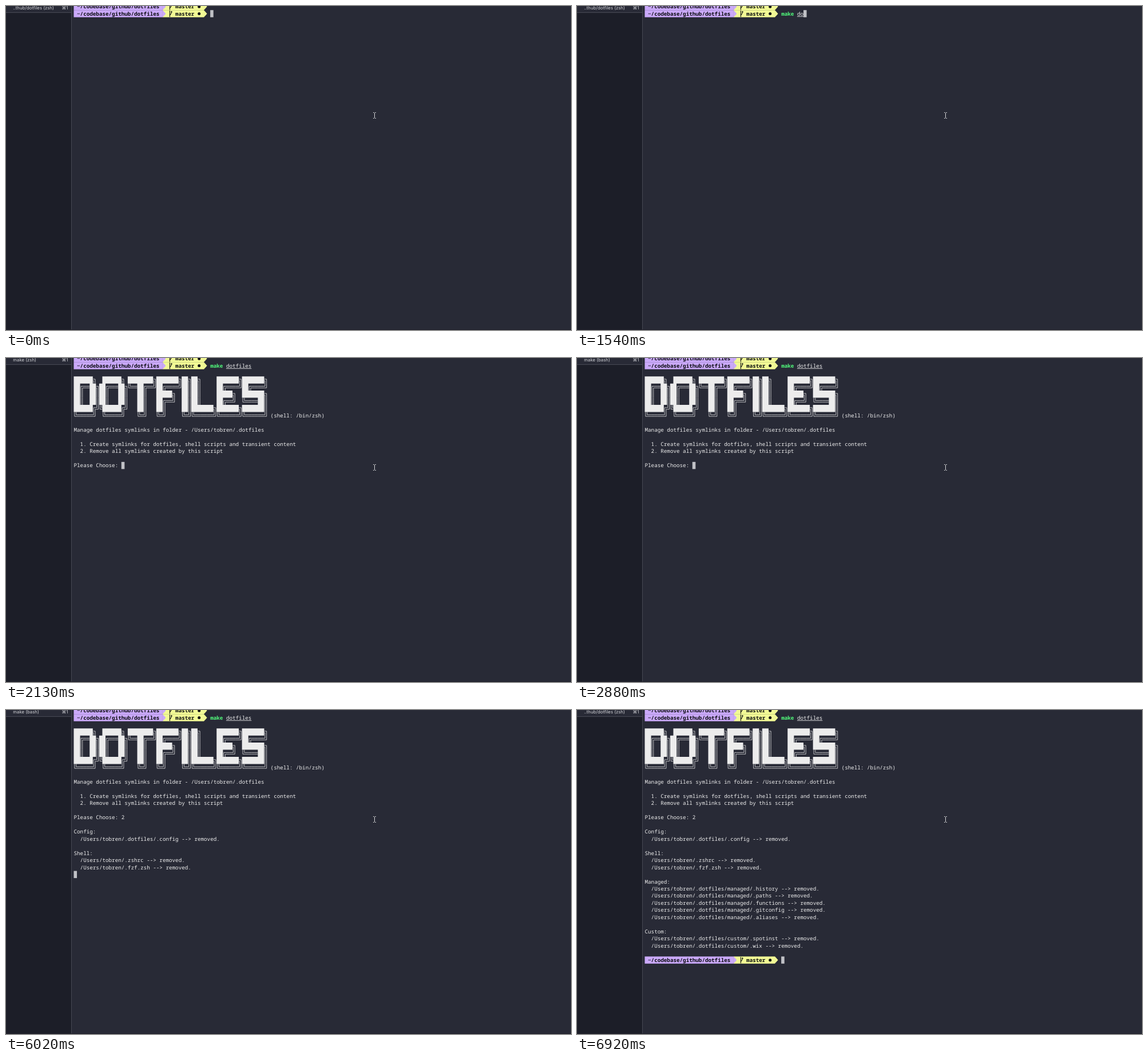
Animation, 988 px wide and 567 px high, one loop 8000 ms. Source, as an HTML page with a canvas:

```html
<!DOCTYPE html>
<html lang="en">
<head>
<meta charset="utf-8">
<title>Terminal session</title>
<style>
html, body { margin: 0; width: 100%; height: 100%; overflow: hidden; background: #282a36; }
canvas { display: block; }
</style>
</head>
<body>
<canvas id="stage" width="988" height="567"></canvas>
<script>
const ctx = document.getElementById('stage').getContext('2d');
const LOOP = 8000;
const CELL_W = 5.55, CELL_H = 12.475, LEFT = 118.5, TOP = 7.2;
const MONO = '9.25px "Noto Sans Mono", monospace';
const COLOR = {
  back: '#282a36', side: '#1c1e28', rule: '#474954', text: '#ececec', cursor: '#c0c1c6',
  path: '#caa9fa', branch: '#f2fa95', ink: '#0b0c10', valid: '#50fa7b', invalid: '#ff5555'
};

const BANNER = [
  '██████╗  ██████╗ ████████╗███████╗██╗██╗     ███████╗███████╗',
  '██╔══██╗██╔═══██╗╚══██╔══╝██╔════╝██║██║     ██╔════╝██╔════╝',
  '██║  ██║██║   ██║   ██║   █████╗  ██║██║     █████╗  ███████╗',
  '██║  ██║██║   ██║   ██║   ██╔══╝  ██║██║     ██╔══╝  ╚════██║',
  '██████╔╝╚██████╔╝   ██║   ██║     ██║███████╗███████╗███████║',
  '╚═════╝  ╚═════╝    ╚═╝   ╚═╝     ╚═╝╚══════╝╚══════╝╚══════╝'
];
const HOME = '/Users/tobren/';
const removed = path => `  ${HOME}${path} --> removed.`;
const MENU = [
  `Manage dotfiles symlinks in folder - ${HOME}.dotfiles`, '',
  '  1. Create symlinks for dotfiles, shell scripts and transient content',
  '  2. Remove all symlinks created by this script'
];
const FIRST_OUTPUT = [
  'Config:', removed('.dotfiles/.config'), '',
  'Shell:', removed('.zshrc'), removed('.fzf.zsh')
];
const LAST_OUTPUT = [
  'Managed:',
  ...['history', 'paths', 'functions', 'gitconfig', 'aliases'].map(n => removed('.dotfiles/managed/.' + n)),
  '', 'Custom:',
  ...['spotinst', 'wix'].map(n => removed('.dotfiles/custom/.' + n))
];

// Each entry lists what changes from its start time on.
const TIMELINE = [
  { at: 0, tab: '..thub/dotfiles (zsh)', command: '', tint: 'text', target: '', cursor: [43, 0] },
  { at: 500, command: 'm', cursor: [44, 0] },
  { at: 650, command: 'mak', tint: 'invalid', cursor: [46, 0] },
  { at: 800, command: 'make', tint: 'valid', cursor: [47, 0] },
  { at: 1090, cursor: [48, 0] },
  { at: 1540, target: 'do', underline: true, cursor: [50, 0] },
  { at: 1690, target: 'dot', cursor: [51, 0] },
  { at: 1840, target: 'dotfiles', underline: false, cursor: [57, 0] },
  { at: 2130, tab: 'make (zsh)', underline: true, menu: true, choice: '', cursor: [15, 14] },
  { at: 2880, tab: 'make (bash)' },
  { at: 3920, choice: '2', cursor: [16, 14] },
  { at: 6020, first: true, cursor: [0, 22] },
  { at: 6170, tab: '..thub/dotfiles (bash)', last: true, cursor: [0, 34] },
  { at: 6320, prompt: true, cursor: [43, 34] },
  { at: 6920, tab: '..thub/dotfiles (zsh)' }
];

const colX = col => LEFT + col * CELL_W;
const rowY = row => TOP + row * CELL_H;

function rect(color, x, y, w, h) {
  ctx.fillStyle = color;
  ctx.fillRect(x, y, w, h);
}

function polygon(color, points) {
  ctx.fillStyle = color;
  ctx.beginPath();
  points.forEach(([x, y]) => ctx.lineTo(x, y));
  ctx.fill();
}

function print(text, col, row, color = COLOR.text, weight = 500) {
  ctx.font = `${weight} ${MONO}`;
  ctx.fillStyle = color;
  ctx.fillText(text, colX(col), rowY(row) + 9.4);
}

const printLines = (lines, row) => lines.forEach((line, i) => print(line, 0, row + i));

function arrowTip(color, col, y) {
  const x = colX(col);
  polygon(color, [[x, y], [x + CELL_W, y + CELL_H / 2], [x, y + CELL_H]]);
}

function drawPrompt(row) {
  const y = rowY(row);
  rect(COLOR.path, LEFT, y, 28 * CELL_W, CELL_H);
  rect(COLOR.branch, colX(28), y, 13 * CELL_W, CELL_H);
  arrowTip(COLOR.path, 28, y);
  arrowTip(COLOR.branch, 41, y);
  print('~/codebase/github/dotfiles', 1, row, COLOR.ink, 700);
  print('master', 32, row, COLOR.ink, 700);

  const x = colX(30);
  ctx.strokeStyle = COLOR.ink;
  ctx.lineWidth = 1.1;
  ctx.beginPath();
  ctx.moveTo(x + 1.4, y + 0.8);
  ctx.lineTo(x + 1.4, y + 12);
  ctx.moveTo(x + 1.4, y + 9.6);
  ctx.bezierCurveTo(x + 1.4, y + 7, x + 4.4, y + 8, x + 4.4, y + 3);
  ctx.stroke();
  polygon(COLOR.ink, [[x + 2.8, y + 3.8], [x + 4.4, y + 1.3], [x + 6, y + 3.8]]);

  ctx.beginPath();
  ctx.arc(colX(39.5), y + 6.4, 2.5, 0, 7);
  ctx.fill();
}

// Horizontal and vertical direction in which each corner opens.
const CORNERS = { '╔': [1, 1], '╗': [-1, 1], '╚': [1, -1], '╝': [-1, -1] };

function traceDouble(char, x, y) {
  const cx = x + CELL_W / 2, cy = y + CELL_H / 2;
  for (const gap of [-1.4, 1.4]) {
    if (char === '═') {
      ctx.moveTo(x, cy + gap);
      ctx.lineTo(x + CELL_W, cy + gap);
    } else if (char === '║') {
      ctx.moveTo(cx + gap, y);
      ctx.lineTo(cx + gap, y + CELL_H);
    } else {
      const [dx, dy] = CORNERS[char];
      ctx.moveTo(cx + dx * CELL_W / 2, cy - gap * dy);
      ctx.lineTo(cx - gap * dx, cy - gap * dy);
      ctx.lineTo(cx - gap * dx, cy + dy * CELL_H / 2);
    }
  }
}

function eachBannerCell(draw) {
  BANNER.forEach((line, row) => [...line].forEach((char, col) => {
    if (char !== ' ') draw(char, colX(col), rowY(row + 2));
  }));
}

function drawBanner() {
  ctx.fillStyle = ctx.strokeStyle = COLOR.text;
  ctx.beginPath();
  eachBannerCell((char, x, y) => char === '█' && ctx.rect(x, y, CELL_W, CELL_H));
  ctx.fill();
  ctx.lineWidth = 0.75;
  ctx.beginPath();
  eachBannerCell((char, x, y) => char !== '█' && traceDouble(char, x, y));
  ctx.stroke();
}

function drawWindow(tab) {
  rect(COLOR.back, 0, 0, 988, 567);
  rect(COLOR.side, 0, 12, 114, 555);
  rect(COLOR.rule, 0, 11, 114, 1);
  rect(COLOR.rule, 114, 0, 1, 567);
  rect('#1f2029', 0, 566, 988, 1);
  ctx.font = '7.75px Inter, "DejaVu Sans", sans-serif';
  ctx.fillStyle = '#d4d5d9';
  ctx.fillText(tab, 12.3, 6.3);
  ctx.textAlign = 'right';
  ctx.fillText('⌘1', 108.3, 6.3);
  ctx.textAlign = 'left';
}

function drawPointer() {
  ctx.strokeStyle = '#d8d8da';
  ctx.lineWidth = 1;
  ctx.stroke(new Path2D('M642 186.5h1.5l1 1l1-1h1.5M644.5 187.5v8M642 196.5h1.5l1-1l1 1h1.5'));
}

function draw(time) {
  const state = Object.assign({}, ...TIMELINE.filter(step => step.at <= time));
  drawWindow(state.tab);
  drawPrompt(-1);
  drawPrompt(0);
  print(state.command, 43, 0, COLOR[state.tint], state.tint === 'text' ? 500 : 600);
  print(state.target, 48, 0);
  if (state.underline) rect(COLOR.text, colX(48), 18, state.target.length * CELL_W, 0.8);

  if (state.menu) {
    drawBanner();
    print('(shell: /bin/zsh)', 62, 7);
    printLines(MENU, 9);
    print('Please Choose: ' + state.choice, 0, 14);
  }
  if (state.first) printLines(FIRST_OUTPUT, 16);
  if (state.last) printLines(LAST_OUTPUT, 23);
  if (state.prompt) drawPrompt(34);

  const [col, row] = state.cursor;
  rect(COLOR.cursor, colX(col), rowY(row), CELL_W, CELL_H);
  drawPointer();
}

ctx.textRendering = 'geometricPrecision';
const start = performance.now();
function tick() {
  draw((performance.now() - start) % LOOP);
  requestAnimationFrame(tick);
}
tick();
</script>
</body>
</html>
```
